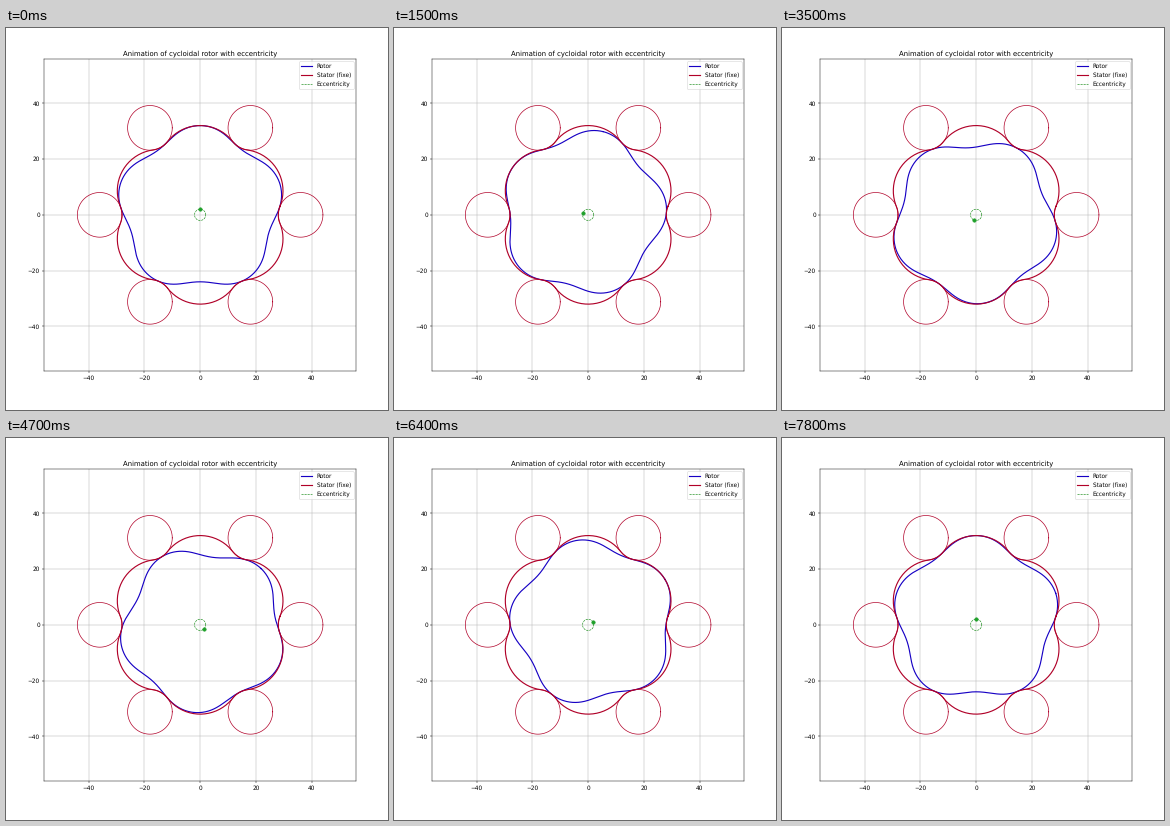
A matplotlib script for the animation above (7900 ms loop, 382 px wide and 382 px high).

```python
import numpy as np
import matplotlib.pyplot as plt
from matplotlib.animation import FuncAnimation

STAGE = 382
DPI = 41.35
FRAMES, INTERVAL = 79, 100

PINS, RING, PIN_R, ECC = 6, 36, 8, 2
LOBES = PINS - 1
BLUE, RED, GREEN, DOT = "#1600c4", "#b00028", "green", "#1fa02a"

plt.rcParams["text.hinting"] = "no_hinting"


def turn(angle):
    return np.exp(1j * np.asarray(angle))


def rotor_shape(n=1000):
    """Inner offset of a trochoid, with one tip pointing up."""
    s = np.linspace(0, 2 * np.pi, n)
    path = RING * turn(s) + ECC * turn(PINS * s)
    normal = RING * turn(s) + PINS * ECC * turn(PINS * s)
    return 1j * (path - PIN_R * normal / abs(normal))


def stator_shape(n=40):
    """Outer lobes joined tangentially by arcs of the pins."""
    half = np.pi / PINS
    top = RING - PIN_R + 2 * ECC
    reach = top + PIN_R
    dist = (reach**2 - RING**2) / (2 * (reach - RING * np.cos(half)))
    sweep = np.angle(RING * turn(half) - dist)
    lobe = dist + (top - dist) * turn(np.linspace(-sweep, sweep, n))
    bend = sweep - half
    dip = RING - PIN_R * turn(np.linspace(bend, -bend, n))
    unit = np.concatenate([lobe * turn(half), dip * turn(2 * half)])
    parts = [unit * turn(2 * half * k) for k in range(PINS)]
    return np.concatenate(parts + [unit[:1]])


def plot(z, *args, **kwargs):
    return ax.plot(np.real(z), np.imag(z), *args, **kwargs)[0]


size = (STAGE + 0.001) / DPI
fig = plt.figure(figsize=(size, size), dpi=DPI)
ax = fig.add_axes([37.9 / STAGE, 38.9 / STAGE, 312.5 / STAGE, 312.5 / STAGE])
ax.set(xlim=(-56, 56), ylim=(-56, 56),
       xticks=range(-40, 41, 20), yticks=range(-40, 41, 20))
ax.grid(True)
ax.set_title("Animation of cycloidal rotor with eccentricity")

circle = turn(np.linspace(0, 2 * np.pi, 121))
shape = rotor_shape()
rotor = plot(shape, color=BLUE, lw=2, label="Rotor")
plot(stator_shape(), color=RED, lw=2, label="Stator (fixe)")
for k in range(PINS):
    plot(RING * turn(2 * np.pi * k / PINS) + PIN_R * circle, color=RED, lw=1.2)
plot(ECC * circle, "--", color=GREEN, lw=1, label="Eccentricity")
dot = plot([ECC * 1j], "o", color=DOT, ms=6)
ax.legend(loc="upper right")


def update(i):
    angle = 2 * np.pi * i / (FRAMES - 1)
    center = ECC * 1j * turn(angle)
    z = center + shape * turn(-angle / LOBES)
    rotor.set_data(z.real, z.imag)
    dot.set_data([center.real], [center.imag])
    return rotor, dot


anim = FuncAnimation(fig, update, frames=FRAMES, interval=INTERVAL,
                     repeat=True, repeat_delay=0)
plt.show()
```
